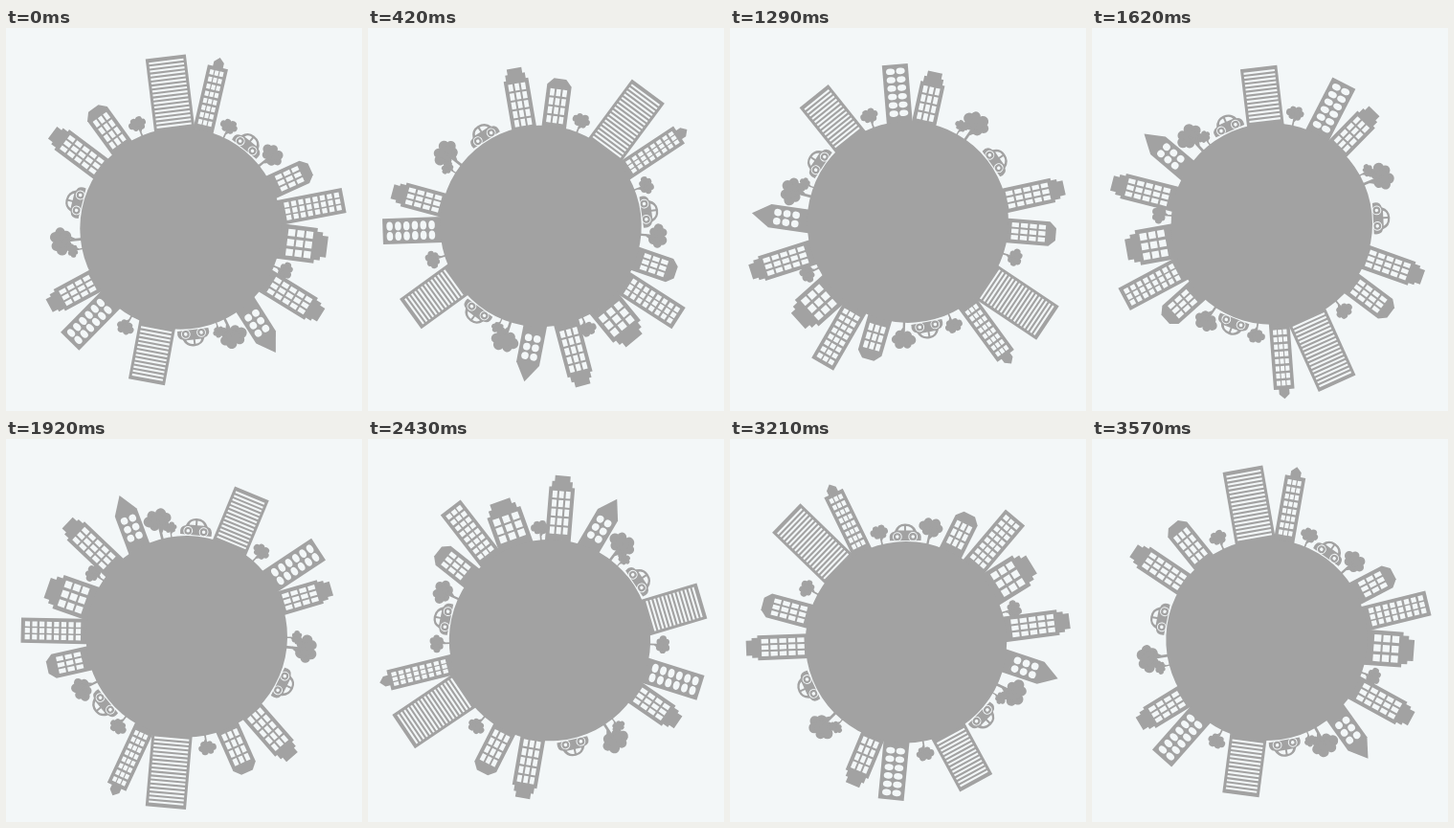
These frames come from a looping animation (372 px wide and 400 px high, 3.6 s). An HTML page:

```html
<!DOCTYPE html>
<html lang="en">
<head>
<meta charset="utf-8">
<title>City globe</title>
<style>
  html, body { margin: 0; width: 100%; height: 100%; overflow: hidden; background: #f3f7f8; }
  svg { display: block; width: 372px; height: 400px; }
  #globe { fill: #a2a2a2; }
  .gap { fill: #f3f7f8; }
  .trunk { fill: none; stroke: #a2a2a2; stroke-linecap: round; }
</style>
</head>
<body>
<svg viewBox="0 0 372 400"><g id="globe"></g></svg>
<script>
const globe = document.getElementById('globe');
const center = { x: 182.5, y: 209.5 };
const radius = 105.2;
const pivot = '185.3 207.7';
const loop = 3600, steps = 120;

function add(parent, tag, attrs) {
  const el = document.createElementNS('http://www.w3.org/2000/svg', tag);
  for (const key in attrs) el.setAttribute(key, attrs[key]);
  return parent.appendChild(el);
}

// Group standing on the ground at the given angle, raised by lift and tilted by lean
function stand(angle, lift = 0, lean = 0) {
  return add(globe, 'g', {
    transform: `translate(${center.x} ${center.y}) rotate(${angle}) ` +
      `translate(0 ${-radius - lift}) rotate(${lean})`
  });
}

// Right half of each roof for half width w, from the top down
const roofs = {
  flat: w => [[w, 0]],
  house: w => [[w / 2, 0], [w, 7]],
  point: w => [[0, 0], [w, 19]],
  spire: w => [[0, 0], [w / 2, 5], [w / 2, 10], [w, 10]],
  steps: w => [[w * .6, 0], [w * .6, 6], [w * .8, 6], [w * .8, 12], [w, 12]]
};

// fill: how much of its cell each window takes across and down
const panes = {
  tall: { cols: 3, pitch: 9.4, fill: [.7, .78] },
  wide: { cols: 3, pitch: 7.6, fill: [.78, .68] },
  stripes: { cols: 1, pitch: 4.2, fill: [1, .5] },
  ovals: { cols: 2, pitch: 8.8, fill: [.88, .75], round: true },
  dots: { cols: 2, pitch: 9.6, fill: [.82, .8], round: true }
};

function building(angle, height, w, roof, pane, lean = 0) {
  const g = stand(angle, height, lean);
  const half = [...roofs[roof](w), [w, height + 10]];
  const left = half.map(([x, y]) => [-x, y]).reverse();
  add(g, 'polygon', { points: [...half, ...left].join(' ') });

  const { cols, pitch, fill, round } = panes[pane];
  const top = half[half.length - 2][1] + 4;
  const cell = (2 * w - 6) / cols;
  const width = cell * fill[0], tall = pitch * fill[1];
  for (let y = top; y + pitch <= height + 1; y += pitch) {
    for (let c = 0; c < cols; c++) {
      const x = (c + .5 - cols / 2) * cell - width / 2;
      add(g, 'rect', {
        class: 'gap', x, y, width, height: tall,
        rx: round ? width / 2 : 0, ry: round ? tall / 2 : 0
      });
    }
  }
}

function tree(angle, size) {
  const height = size * 1.36;
  const g = stand(angle);
  for (let i = 0; i < 6; i++) {
    const a = i * Math.PI / 3;
    add(g, 'circle', {
      cx: Math.cos(a) * size * .62,
      cy: Math.sin(a) * size * .42 - height,
      r: size * (i % 2 ? .38 : .34)
    });
  }
  add(g, 'circle', { cx: 0, cy: -height, r: size * .45 });
  add(g, 'path', {
    class: 'trunk', 'stroke-width': size * .18,
    d: `M0 2V${-height}M0 ${-height * .3}L${size * .4} ${-height * .75}`
  });
}

function car(angle) {
  const g = stand(angle);
  add(g, 'path', { d: 'M-16 -1Q-18 -9 -11 -10.5Q-8 -18.5 0 -18.5Q9 -18.5 12 -10.5Q18 -9 16.5 -1Z' });
  add(g, 'path', { class: 'gap', d: 'M-7.5 -11.5Q-6 -16 -1 -16.1V-11.5ZM1 -11.5V-16.1Q6.5 -16 8.4 -11.5Z' });
  for (const x of [-8.2, 8.2]) {
    for (const [r, name] of [[4.9, 'gap'], [3.9, ''], [1.8, 'gap']]) {
      add(g, 'circle', { class: name, cx: x, cy: -5, r });
    }
  }
}

building(-5, 75, 21.2, 'flat', 'stripes', -2);
building(13, 78, 10.8, 'spire', 'wide');
building(65.4, 44, 12.8, 'house', 'tall');
building(80.2, 68, 13.2, 'flat', 'wide', -1);
building(97.2, 49, 18.5, 'steps', 'tall');
building(121.6, 67, 13.4, 'steps', 'tall');
building(142.5, 58, 12.2, 'point', 'dots', 5);
building(192.5, 59, 19.3, 'flat', 'stripes', -2);
building(224.5, 60, 13.5, 'flat', 'ovals');
building(239.6, 54, 12.8, 'steps', 'tall', 2);
building(306.8, 62, 13, 'steps', 'tall');
building(324, 50, 12.8, 'house', 'tall');

for (const angle of [-22.5, 25.3, 112, 209.3]) tree(angle, 9.6);
for (const angle of [-96, 154]) {
  tree(angle, 15);
  tree(angle + (angle < 0 ? -5.5 : 5.3), 7.4);
}
tree(51.3, 13);

for (const angle of [38.5, 173, -75.8]) car(angle);

add(globe, 'circle', { cx: center.x, cy: center.y, r: radius });

// A full turn in even steps, running slightly ahead early on, with a small wobble
function draw(now) {
  const t = Math.floor(now % loop / loop * steps) / steps;
  const wave = Math.sin(2 * Math.PI * t);
  const angle = 360 * t + 2.3 * Math.max(0, wave);
  const sway = Math.abs(wave);
  globe.setAttribute('transform',
    `rotate(${angle} ${pivot}) translate(${-1.7 * sway} ${1.4 * sway})`);
}

const start = performance.now();
function tick() {
  draw(performance.now() - start);
  requestAnimationFrame(tick);
}
tick();
</script>
</body>
</html>
```
